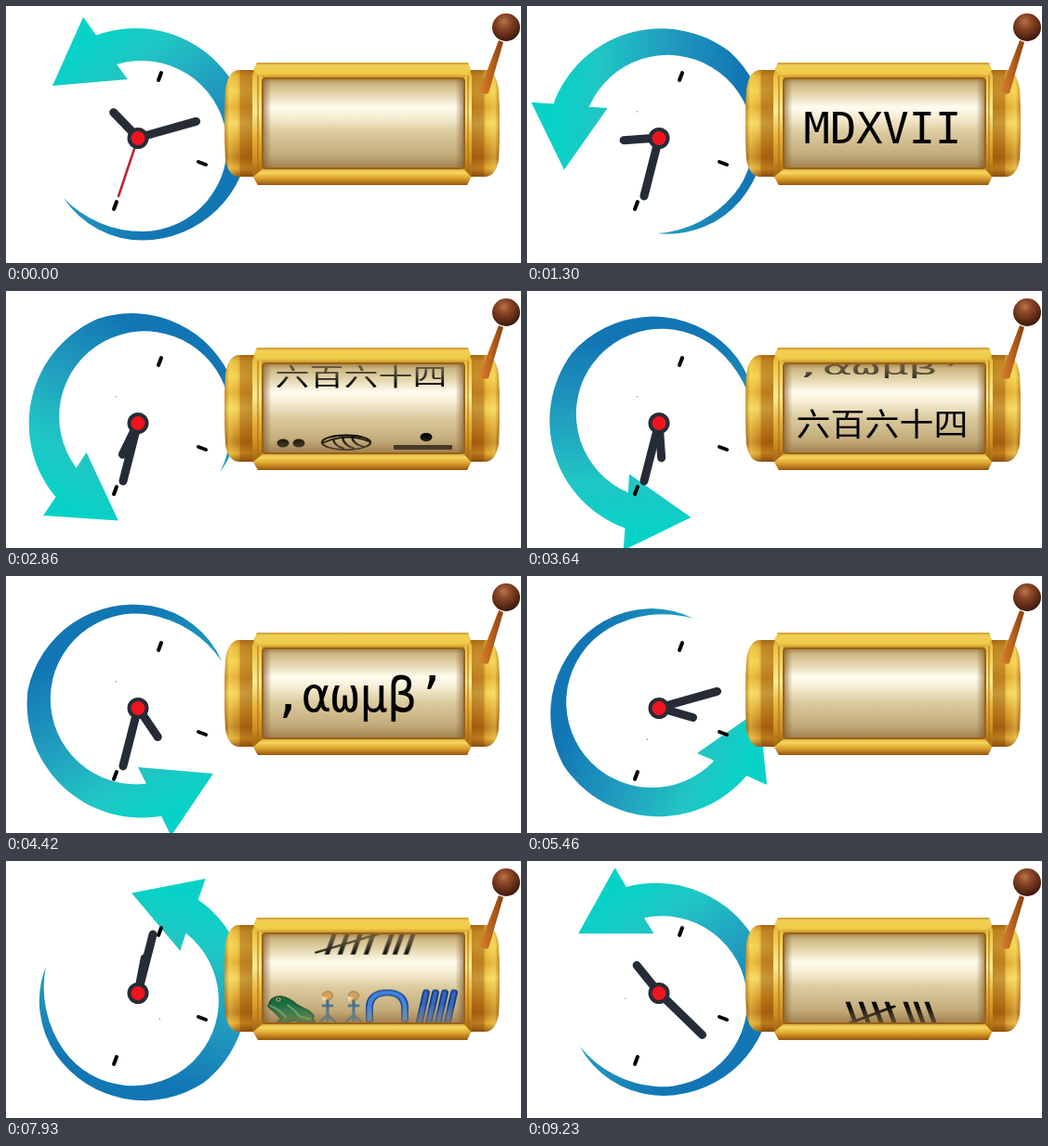
Animation, 554 px wide and 277 px high, one loop 9360 ms. Source, as an HTML page:

```html
<!DOCTYPE html>
<html lang="en">
<head>
<meta charset="utf-8">
<title>Time machine</title>
<style>
  html, body { margin: 0; width: 100%; height: 100%; overflow: hidden; background: #fff; }
  svg { display: block; width: 554px; height: 277px; }
  .mono { font: 47px "DejaVu Sans Mono", "Noto Sans Mono", monospace; text-anchor: middle; }
  .greek { font-size: 51px; }
  .cjk { font: 37px "Noto Sans CJK SC", "Noto Sans CJK", "Noto Sans CJK JP", sans-serif; text-anchor: middle; }
  .line { fill: none; stroke-linecap: round; stroke-linejoin: round; }
</style>
</head>
<body>
<svg viewBox="0 0 554 277">
  <defs>
    <linearGradient id="arrowFill" gradientUnits="userSpaceOnUse" x1="75" y1="50" x2="205" y2="205">
      <stop offset="0" stop-color="#08d2c7"/><stop offset=".25" stop-color="#20c6c4"/>
      <stop offset=".6" stop-color="#219dbf"/><stop offset="1" stop-color="#1276b4"/>
    </linearGradient>
    <linearGradient id="capFill" x2="0" y2="1">
      <stop offset="0" stop-color="#b87c1c"/><stop offset=".06" stop-color="#e3b136"/>
      <stop offset=".2" stop-color="#f1cd4c"/><stop offset=".35" stop-color="#dfa52c"/>
      <stop offset=".5" stop-color="#f2d560"/><stop offset=".7" stop-color="#cf8f22"/>
      <stop offset=".82" stop-color="#b06a14"/><stop offset=".92" stop-color="#dca12c"/>
      <stop offset="1" stop-color="#84480c"/>
    </linearGradient>
    <linearGradient id="capShade">
      <stop offset="0" stop-color="#8b4b08" stop-opacity=".4"/><stop offset=".15" stop-color="#ffe873" stop-opacity=".4"/>
      <stop offset=".4" stop-color="#ffdf60" stop-opacity=".15"/><stop offset=".5" stop-color="#9a540c" stop-opacity=".45"/>
      <stop offset="1" stop-color="#8d4a0a" stop-opacity=".5"/>
    </linearGradient>
    <linearGradient id="sideFill" x2="0" y2="1">
      <stop offset="0" stop-color="#d9a530"/><stop offset=".15" stop-color="#eec648"/>
      <stop offset=".4" stop-color="#fbec92"/><stop offset=".6" stop-color="#e6b53c"/>
      <stop offset=".8" stop-color="#c88a20"/><stop offset="1" stop-color="#8d4f0d"/>
    </linearGradient>
    <linearGradient id="topFill" x2="0" y2="1">
      <stop offset="0" stop-color="#c99730"/><stop offset=".2" stop-color="#f0d055"/>
      <stop offset=".7" stop-color="#f1cb48"/><stop offset="1" stop-color="#c38a24"/>
    </linearGradient>
    <linearGradient id="bottomFill" x2="0" y2="1">
      <stop offset="0" stop-color="#d9a738"/><stop offset=".25" stop-color="#f4d75c"/>
      <stop offset=".6" stop-color="#dca02a"/><stop offset="1" stop-color="#95560f"/>
    </linearGradient>
    <linearGradient id="glassFill" x2="0" y2="1">
      <stop offset="0" stop-color="#a3824c"/><stop offset=".06" stop-color="#cdb682"/>
      <stop offset=".18" stop-color="#e4d6ad"/><stop offset=".32" stop-color="#fffcef"/>
      <stop offset=".42" stop-color="#f7efd6"/><stop offset=".6" stop-color="#dccba0"/>
      <stop offset=".85" stop-color="#c3ab7a"/><stop offset="1" stop-color="#a08050"/>
    </linearGradient>
    <linearGradient id="glassEdge">
      <stop offset="0" stop-color="#7a5424" stop-opacity=".6"/><stop offset=".04" stop-color="#8a6430" stop-opacity="0"/>
      <stop offset=".96" stop-color="#8a6430" stop-opacity="0"/><stop offset="1" stop-color="#7a5424" stop-opacity=".6"/>
    </linearGradient>
    <linearGradient id="stickFill">
      <stop offset="0" stop-color="#d9822f"/><stop offset=".5" stop-color="#b9621d"/><stop offset="1" stop-color="#87400f"/>
    </linearGradient>
    <radialGradient id="ballFill" cx=".42" cy=".3" r=".7">
      <stop offset="0" stop-color="#b9744a"/><stop offset=".35" stop-color="#8a4626"/>
      <stop offset=".8" stop-color="#542612"/><stop offset="1" stop-color="#3a170b"/>
    </radialGradient>
    <linearGradient id="fade" gradientUnits="userSpaceOnUse" x1="0" y1="79" x2="0" y2="174">
      <stop offset="0" stop-color="#fff" stop-opacity=".4"/><stop offset=".25" stop-color="#fff"/>
      <stop offset=".8" stop-color="#fff"/><stop offset="1" stop-color="#fff" stop-opacity=".45"/>
    </linearGradient>
    <mask id="glassMask" maskUnits="userSpaceOnUse" x="277" y="79" width="215" height="95">
      <rect x="277" y="79" width="215" height="95" fill="url(#fade)"/>
    </mask>
    <path id="capShape" d="M270 69 H250 Q239 70 236 90 Q234 127 236 165 Q239 183 250 184 H270 Z"/>
    <g id="cap"><use href="#capShape" fill="url(#capFill)"/><use href="#capShape" fill="url(#capShade)"/></g>
    <path id="wedge" d="M-7 -7 H7 L0 6 Z M0 6 L-3 20"/>
    <path id="chevron" d="M18 -19 L0 0 L18 20 M0 0 L12 -8 V8 Z"/>
    <g id="lotus">
      <path class="line" d="M0 24 V-4 M-8 25 L0 16 L8 25 M-5 4 H5" stroke="#3f6d8e" stroke-width="3"/>
      <circle cy="-9" r="5.5" fill="#d3a25c" stroke="#9a6a35"/>
      <path d="M-7 -9 L0 -6 L-5 -1 Z" fill="#f0d9a8"/>
    </g>
    <path id="arch" d="M391 22 V4 Q393 -13 410 -13 Q427 -13 429 4 V22"/>
    <path id="bars" d="M452 -13 L445 24 M462 -13 L455 24 M472 -13 L465 24 M482 -13 L475 24"/>
  </defs>

  <path id="arrow" fill="url(#arrowFill)"
    d="M50 86 L83 12 L97 31.5 A123 123 0 0 1 262 139.5 A116 116 0 0 1 147 252.5 A102 102 0 0 1 62 207
       A118 118 0 0 0 147 243 A92 92 0 1 0 119 63 L131 79 Z"/>

  <path class="line" d="M167 72 L164 80 M207 168 L215 171 M119 211 L116 219" stroke="#000" stroke-width="4"/>
  <g class="line" stroke="#262c37" stroke-width="9">
    <path id="hourHand" d="M142 142 H180"/>
    <g id="minuteHand">
      <path d="M142 142 H207"/>
      <rect x="120" y="171" width="1" height="1" fill="#444" stroke="none"/>
    </g>
  </g>
  <path id="secondHand" class="line" d="M142 142 L121 205" stroke="#b9242c" stroke-width="2.5"/>
  <circle cx="142" cy="142.500" r="9.5" fill="#f0141f" stroke="#262c37" stroke-width="4"/>

  <g id="machine">
    <use href="#cap"/>
    <use href="#cap" transform="translate(766 0) scale(-1 1)"/>
    <path d="M530 37 L535 39 L519 94 Q514 96 509 92 Z" fill="url(#stickFill)"/>
    <circle cx="538" cy="23" r="15" fill="url(#ballFill)"/>
    <path d="M270 61 H497 L501 75 V182 L496 193 H271 L265 182 V75 Z" fill="url(#sideFill)"/>
    <path d="M270 61 H497 L500 69 L492 78 H277 L266 69 Z" fill="url(#topFill)"/>
    <path d="M277 175 H492 L500 184 L496 193 H271 L266 184 Z" fill="url(#bottomFill)"/>
    <path class="line" d="M271 76 V178 M497 76 V178" stroke="#a8680f" stroke-opacity=".5" stroke-width="2"/>
    <rect x="276" y="78" width="217" height="97" rx="3" fill="url(#glassFill)" stroke="#9b6218" stroke-width="2"/>
    <rect x="277" y="79" width="215" height="95" fill="url(#glassEdge)"/>
  </g>

  <g mask="url(#glassMask)">
    <g data-center="10"><text class="mono" x="382.500" y="21.500">MDXVII</text></g>

    <g data-center="18">
      <circle cx="298" cy="6" r="6.5"/><circle cx="315" cy="6" r="6.5"/>
      <g class="line" stroke="#000" stroke-width="2.5">
        <ellipse cx="366" cy="5" rx="26" ry="11"/>
        <path d="M342 5 Q366 -10 390 3 M352 0 Q353 10 363 14 M362 -3 Q363 9 374 14 M372 -3 Q374 8 384 11"/>
      </g>
      <circle cx="452" cy="-3" r="6.5"/><rect x="417" y="9" width="63" height="7"/>
    </g>

    <g data-center="26"><text class="cjk" x="382" y="13">六百六十四</text></g>
    <g data-center="34"><text class="mono greek" x="380" y="19">,αωμβ’</text></g>

    <g data-center="50" class="line" stroke="#000" stroke-width="5">
      <path d="M316 -14 Q327 -18 338 -15 L325 -4 Z M325 -4 L320 18"/>
      <use href="#chevron" x="369" y="-1"/><use href="#chevron" x="385" y="-1"/>
      <use href="#wedge" x="420" y="-11"/><use href="#wedge" x="434" y="-11"/><use href="#wedge" x="448" y="-11"/>
      <path d="M413 -18 L417 11 H444 L454 -17 M417 11 L429 20 L444 11 M429 20 L426 31"/>
    </g>

    <g data-center="58">
      <path d="M282 5 Q285 -9 296 -8 Q305 -6 313 3 L326 11 Q333 17 330 21 L333 26 H318 L309 23 L303 26 H291 L296 21 Q289 12 282 5 Z" fill="#1b6d40" stroke="#0f4029" stroke-width="1.5"/>
      <path class="line" d="M284 4 Q294 8 301 19 M303 3 Q310 9 316 18 L327 21" stroke="#5fa56d" stroke-width="2"/>
      <circle cx="293" cy="-4" r="2.5" fill="#d3bd62"/><circle cx="293" cy="-4" r="1.2"/>
      <use href="#lotus" x="346"/><use href="#lotus" x="374"/>
      <g class="line" stroke="#183f86" stroke-width="8"><use href="#arch"/><use href="#bars"/></g>
      <use href="#arch" class="line" stroke="#3f83dc" stroke-width="5"/>
      <use href="#bars" class="line" stroke="#3468bd" stroke-width="4"/>
    </g>

    <g data-center="66" data-lean=".2" class="line" stroke="#000" stroke-width="5">
      <path stroke-linecap="butt" d="M350 -25 V24 M364 -25 V24 M378 -25 V24 M392 -25 V24 M412 -25 V24 M423 -25 V24 M435 -25 V24"/>
      <path stroke-width="4" d="M338 20 L398 -16"/>
    </g>
  </g>
</svg>
<script>
  const FRAME_MS = 130, FRAMES = 72;
  const DRUM = { y: 126.5, radius: 47, degPerFrame: 11.25 };
  const byId = id => document.getElementById(id);
  const arrow = byId("arrow"), hour = byId("hourHand"), minute = byId("minuteHand"), second = byId("secondHand");
  const numerals = [...document.querySelectorAll("[data-center]")];

  const spin = (el, deg) => el.setAttribute("transform", `rotate(${deg} 142 142)`);

  // Each numeral rides down the front of a cylinder.
  function rollNumeral(el, frame) {
    const deg = (frame - el.dataset.center) * DRUM.degPerFrame;
    const visible = frame > 0 && Math.abs(deg) < 89;
    el.style.display = visible ? "" : "none";
    if (!visible) return;
    const rad = deg * Math.PI / 180;
    const y = DRUM.y + DRUM.radius * Math.sin(rad);
    const lean = deg * (el.dataset.lean || 0);
    el.setAttribute("transform", `translate(0 ${y}) scale(1 ${Math.cos(rad)}) skewX(${lean})`);
  }

  function render(frame) {
    spin(arrow, -5 * frame);
    spin(hour, 226 - 5 * frame);
    spin(minute, -15.7 - 60 * frame);
    second.style.display = frame === 0 ? "" : "none";
    numerals.forEach(el => rollNumeral(el, frame));
  }

  function tick() {
    render(Math.floor(performance.now() / FRAME_MS) % FRAMES);
    requestAnimationFrame(tick);
  }
  tick();
</script>
</body>
</html>
```
